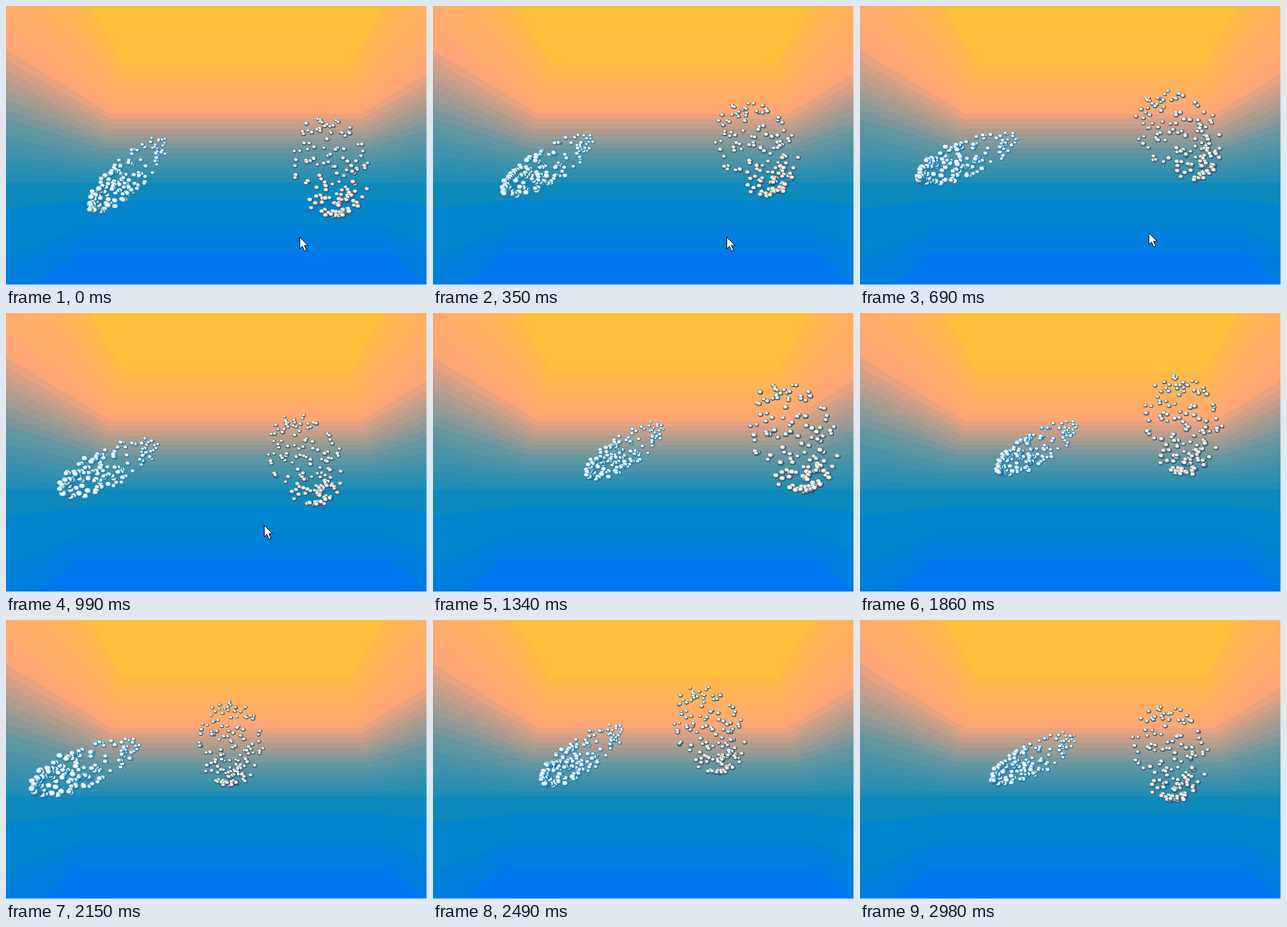
An HTML page with a canvas for the animation above (3.08 s loop, 604 by 400 pixels).

```html
<!DOCTYPE html>
<html>
<head>
<meta charset="utf-8">
<style>
html, body { margin: 0; width: 604px; height: 400px; overflow: hidden; }
canvas { display: block; }
</style>
</head>
<body>
<canvas id="stage" width="604" height="400"></canvas>
<script>
const W = 604, H = 400, LOOP = 3080, STEP = 58.6, LAST = 51;
const HORIZON = 253;
const ctx = document.getElementById('stage').getContext('2d');

function randomizer(seed) {
  return () => (seed = (seed * 16807) % 2147483647) / 2147483647;
}

// Smooth curve through points of [step, values...]
function curve(points, k) {
  let i = 0;
  while (i < points.length - 2 && k >= points[i + 1][0]) i++;
  const a = points[i], b = points[i + 1];
  const before = points[i - 1] || a, after = points[i + 2] || b;
  const span = b[0] - a[0], f = (k - a[0]) / span;
  return a.map((v, j) => {
    const m0 = (b[j] - before[j]) / (b[0] - before[0]) * span;
    const m1 = (after[j] - v) / (after[0] - a[0]) * span;
    const d = b[j] - v;
    return v + f * (m0 + f * (3 * d - 2 * m0 - m1 + f * (m0 + m1 - 2 * d)));
  });
}

// A colour band bent at the corners of a room, flat at the horizon
function band(y, color) {
  const left = 188 - y * 0.24, right = 478 + y * 0.2;
  const d = (HORIZON - y) / 98;
  const slope = d > 0 ? 0.61 * d * Math.max(1, d) ** 0.88 : -0.81 * (-d) ** 1.5;
  ctx.fillStyle = color;
  ctx.beginPath();
  ctx.moveTo(0, y - slope * left);
  ctx.lineTo(left, y);
  ctx.lineTo(right, y);
  ctx.lineTo(W, y - slope * (W - right));
  ctx.lineTo(W, 600);
  ctx.lineTo(0, 600);
  ctx.fill();
}

function bands(from, to, step, start, end) {
  for (let y = from; y < to; y += step) {
    const f = (y - from) / (to - from);
    band(y, `rgb(${start.map((c, i) => Math.round(c + (end[i] - c) * f))})`);
  }
}

function background() {
  ctx.fillStyle = '#ffc03c';
  ctx.fillRect(0, 0, W, H);
  bands(83, 155, 12, [255, 184, 74], [254, 164, 124]);
  bands(155, 204, 7, [230, 162, 129], [104, 150, 160]);
  bands(204, HORIZON, 7, [100, 150, 160], [20, 140, 184]);
  band(HORIZON, '#0c8abe');
  band(278, '#0085ce');
  band(316, '#0081d8');
  band(329, '#007ee0');
  band(352, '#0077ee');
}

// Path points: step, centre x, centre y, angle of the long axis
const flocks = [
  {
    seed: 4127, length: 72, width: 24, size: 3.5, taper: 0.33,
    colors: ['#1f78a6', '#a8d8e8', '#ffffff'],
    path: [
      [0, 176, 242, -0.77], [12, 155, 217, -0.4], [17, 148, 221, -0.47],
      [28, 344, 183, -0.65], [37, 114, 210, -0.42], [43, 215, 193, -0.6],
      [51, 249, 199, -0.5]
    ]
  },
  {
    seed: 9311, length: 68, width: 52, size: 3, taper: 0.15,
    colors: ['#1c587c', '#c6bcae', '#fffaf2'],
    path: [
      [0, 466, 230, -1.79], [12, 458, 184, -2.27], [17, 429, 210, -2],
      [28, 557, 152, -1.86], [37, 322, 176, -1.57], [43, 396, 157, -1.97],
      [47, 530, 168, -1.9], [51, 445, 190, -1.78]
    ]
  }
];

// Each flock fills an ellipse, denser towards one end
for (const flock of flocks) {
  const rand = randomizer(flock.seed);
  flock.balls = Array.from({ length: 150 }, () => {
    const u = 2 * rand() ** 1.25 - 1;
    const v = (2 * rand() - 1) * Math.sqrt(1 - u * u);
    return { u, v, phase: rand() * 6.28, scale: 0.85 + rand() * 0.3 };
  }).sort((a, b) => b.u - a.u);
}

function disc(x, y, r, color) {
  ctx.fillStyle = color;
  ctx.beginPath();
  ctx.ellipse(x, y, r * 1.15, r * 0.92, 0, 0, 7);
  ctx.fill();
}

function drawFlock({ path, balls, length, width, size, taper, colors }, k) {
  const [, cx, cy, angle] = curve(path, k);
  const zoom = 0.9 + 0.45 * ((cx - 310) / 260) ** 2; // nearer at the sides
  const cos = Math.cos(angle) * zoom, sin = Math.sin(angle) * zoom;
  for (const { u, v, phase, scale } of balls) {
    const along = u * length, across = v * width;
    const x = cx + along * cos - across * sin + 2 * Math.sin(k * 0.3 + phase);
    const y = cy + along * sin + across * cos + 2 * Math.cos(k * 0.25 + phase);
    const r = size * zoom * scale * (1 - taper * u);
    disc(x, y, r, colors[0]);
    disc(x - r * 0.15, y - r * 0.2, r * 0.78, colors[1]);
    disc(x - r * 0.22, y - r * 0.3, r * 0.56, colors[2]);
  }
}

const arrow = new Path2D('M.5 .5V17L4.3 13.4L7.4 20.5L10.2 19.3L7.2 12.3H12.2Z');

// Rests, then speeds away up and left
function pointer(k) {
  if (k > 19) return;
  const p = Math.max(0, (k - 9) / 10);
  ctx.save();
  ctx.translate(Math.round(421 - 80 * p ** 2), Math.round(331 - 38 * p ** 1.6));
  ctx.fillStyle = '#fff';
  ctx.strokeStyle = '#000';
  ctx.fill(arrow);
  ctx.stroke(arrow);
  ctx.restore();
}

function draw(t) {
  // The picture advances in discrete steps
  const k = t < 50 ? 0 : Math.min(LAST, Math.floor((t + 30) / STEP));
  background();
  for (const flock of flocks) drawFlock(flock, k);
  pointer(k);
  ctx.fillStyle = 'rgba(255,255,255,.6)';
  ctx.fillRect(W - 1, 0, 1, H);
  ctx.fillRect(0, H - 1, W, 1);
}

const start = performance.now();
function tick() {
  draw((performance.now() - start) % LOOP);
  requestAnimationFrame(tick);
}
tick();
</script>
</body>
</html>
```
